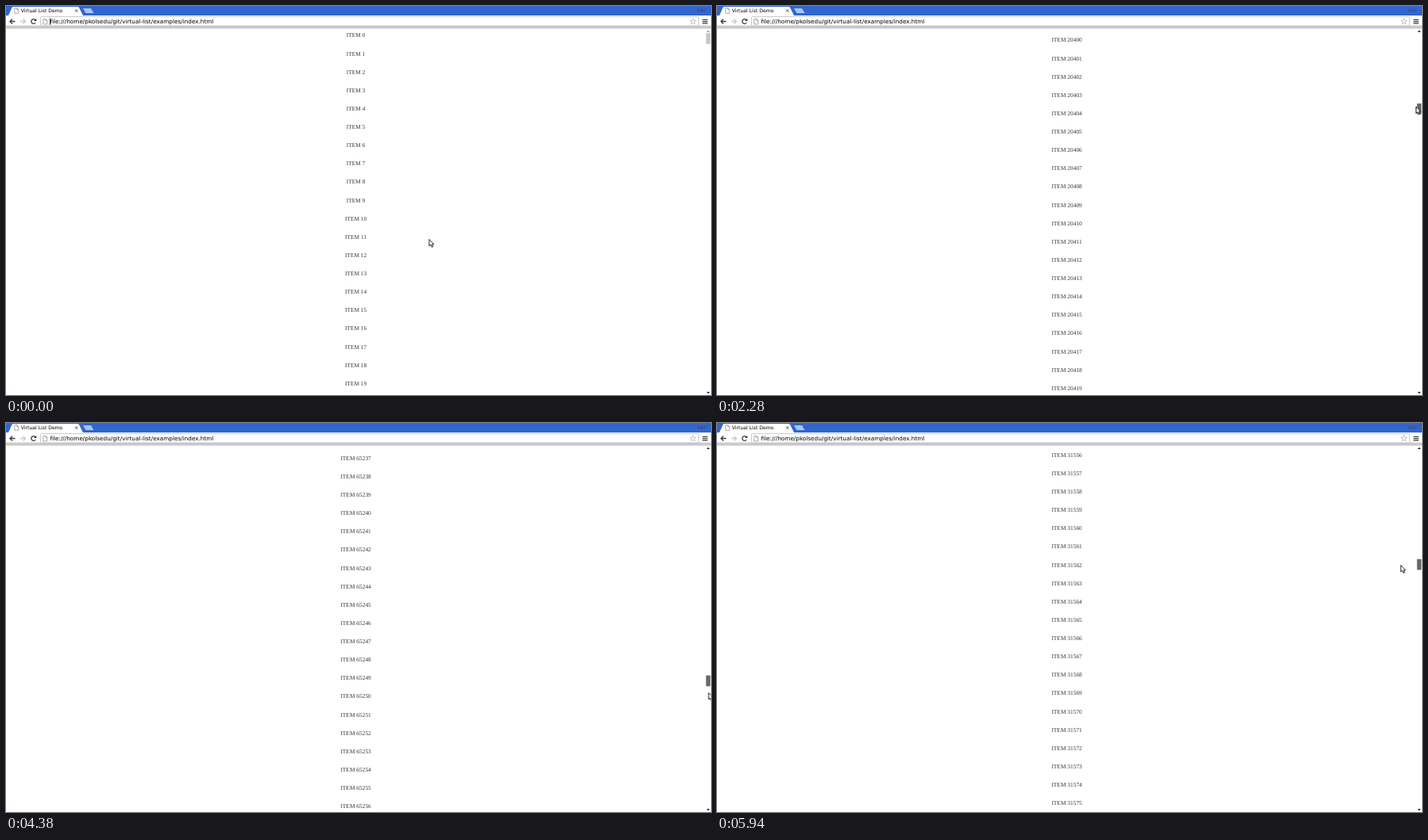
Write an HTML page that moves like this. It is 888 px wide and 491 px high and loops after 6000 ms.

```html
<!DOCTYPE html>
<html lang="en">
<head>
<meta charset="utf-8">
<title>Virtual List Demo</title>
<style>
  html, body { margin: 0; width: 100%; height: 100%; overflow: hidden; background: #fff; }
  svg { display: block; width: 888px; height: 491px; }
  text { font-family: "DejaVu Sans", sans-serif; text-rendering: geometricPrecision; }
  #list text { font: 7.4px "Liberation Serif", serif; text-anchor: middle; fill: #363636; }
  .line { fill: none; stroke: #3c3c3c; stroke-width: 1.3; }
  .off { stroke: #c9c9c9; }
</style>
</head>
<body>
<svg viewBox="0 0 888 491">
  <defs>
    <clipPath id="page"><rect y="28.5" width="888" height="463"/></clipPath>
    <path id="sheet" d="M0 0H3L5 2V6.6H0ZM3 0V2H5" fill="#fff" stroke="#858585" stroke-width=".7"/>
    <path id="arrow" class="line" d="M6.5 0H0M3 -3L0 0L3 3"/>
  </defs>
  <g id="list" clip-path="url(#page)"></g>

  <!-- scrollbar -->
  <rect id="thumb" x="881.7" width="5.5" height="13.6"/>
  <path id="up" d="M882.4 33L884.5 30.6L886.6 33Z"/>
  <path d="M882.4 487L884.5 489.4L886.6 487Z" fill="#333"/>

  <!-- tab strip -->
  <rect width="888" height="12" fill="#3166cf"/>
  <path d="M3 12L7.5 2Q8 1 9.5 1H90Q91.500 1 92 2L97 12Z" fill="#fff"/>
  <path d="M97 3H107L110.5 9H100.5Z" fill="#a6c6f8"/>
  <use href="#sheet" x="10.8" y="2.6"/>
  <text x="18.8" y="8.2" font-size="6.1">Virtual List Demo</text>
  <path class="line" d="M87 4.3l3.3 3.3m0 -3.3l-3.3 3.3" style="stroke-width:.9"/>
  <text x="870.5" y="7.4" font-size="5.9" fill="#463c3c">Lou</text>

  <!-- toolbar -->
  <rect y="24.6" width="888" height="4" fill="#cacaca"/>
  <rect x="43.5" y="13.5" width="829" height="11.5" rx="1" fill="#fff" stroke="#b5b5b5" stroke-width=".7"/>
  <use href="#arrow" x="5" y="19.5"/>
  <g class="off"><path class="line" d="M18 19.5h6.500m-3 -3l3 3l-3 3" style="stroke:#c9c9c9"/></g>
  <path class="line" d="M37.2 21A2.9 2.9 0 1 1 36.900 17.5"/>
  <path d="M38.3 15.800v3.300h-3.300Z" fill="#3c3c3c"/>
  <use href="#sheet" x="46.8" y="16.3"/>
  <text x="55.4" y="22.2" font-size="7.28">file:///home/pkolsedu/git/virtual-list/examples/index.html</text>
  <rect id="caret" x="55.2" y="15.5" width=".9" height="8.3"/>
  <text x="865.5" y="23.3" font-size="11" fill="#666" text-anchor="middle">☆</text>
  <path class="line" d="M877.2 17.3h6.600m-6.600 2.300h6.600m-6.600 2.300h6.600"/>

  <path id="cursor" d="M0 0V8.5L2 6.8L3.4 9.900L4.900 9.200L3.500 6.300H6Z" fill="#fff" stroke="#111" stroke-width=".9"/>
</svg>
<script>
const LOOP = 6000, TICK = 60, STEP = 1.283;
const PITCH = 23.125, COUNT = 100000, TRACK = 436;
const GRAB = 13, RELEASE = 37, REGRAB = 45;
const [list, thumb, cursor, caret, up] =
  ['list', 'thumb', 'cursor', 'caret', 'up'].map(id => document.getElementById(id));

// Key poses: step, pointer x and y, topmost item
const poses = [
  [0, 533, 294.5, 0],
  [GRAB, 884.5, 36, 0],
  [18, 884.5, 42, 1381.22],
  [30, 880.5, 127, 20399.74],
  [RELEASE, 884, 145, 24455.31],
  [REGRAB, 884, 149, 24455.31],
  [57, 885, 340.5, 65236.68],
  [66, 874.8, 455, 94561.34],
  [68, 873, 478, 99980],
  [77, 861.3, 179.5, 31555.85]
];

function poseAt(k) {
  const i = Math.max(1, poses.findIndex(p => p[0] >= k));
  const a = poses[i - 1], b = poses[i];
  const p = (k - a[0]) / (b[0] - a[0]);
  const e = k < GRAB ? 1 - (1 - p) ** 3 : p;
  let [, x, y, top] = a.map((v, j) => v + (b[j] - v) * e);
  if (k > RELEASE && k < REGRAB) {
    // the free pointer swings out of the scrollbar and back
    const swing = Math.sin(Math.PI * p);
    x -= 45 * swing;
    y += 21 * swing;
  }
  return { x, y, top };
}

const rows = Array.from({ length: 22 }, () => {
  const row = document.createElementNS('http://www.w3.org/2000/svg', 'text');
  row.setAttribute('x', 440.6);
  return list.appendChild(row);
});

function draw(k) {
  const { x, y, top } = poseAt(k);
  rows.forEach((row, i) => {
    const n = Math.floor(top) + i;
    row.textContent = n < COUNT ? 'ITEM ' + n : '';
    row.setAttribute('y', 39.4 + (n - top) * PITCH);
  });

  const ty = 34.2 + top / COUNT * TRACK;
  const held = k >= GRAB && k <= RELEASE || k >= REGRAB;
  const over = x >= 882 && y >= ty && y <= ty + 14;
  thumb.setAttribute('y', ty);
  thumb.setAttribute('fill', held ? '#686868' : over ? '#a9a9a9' : '#c6c6c6');
  up.setAttribute('fill', top > 0 ? '#333' : '#999');
  cursor.setAttribute('transform', `translate(${x} ${y})`);
  // the caret blinks until the page takes the focus
  caret.style.display = k <= GRAB && k % 13 < 7 ? '' : 'none';
}

function frame() {
  const tick = Math.floor(performance.now() % LOOP / TICK);
  draw(Math.ceil((tick + 0.7) / STEP) - 1);
  requestAnimationFrame(frame);
}
frame();
</script>
</body>
</html>
```
